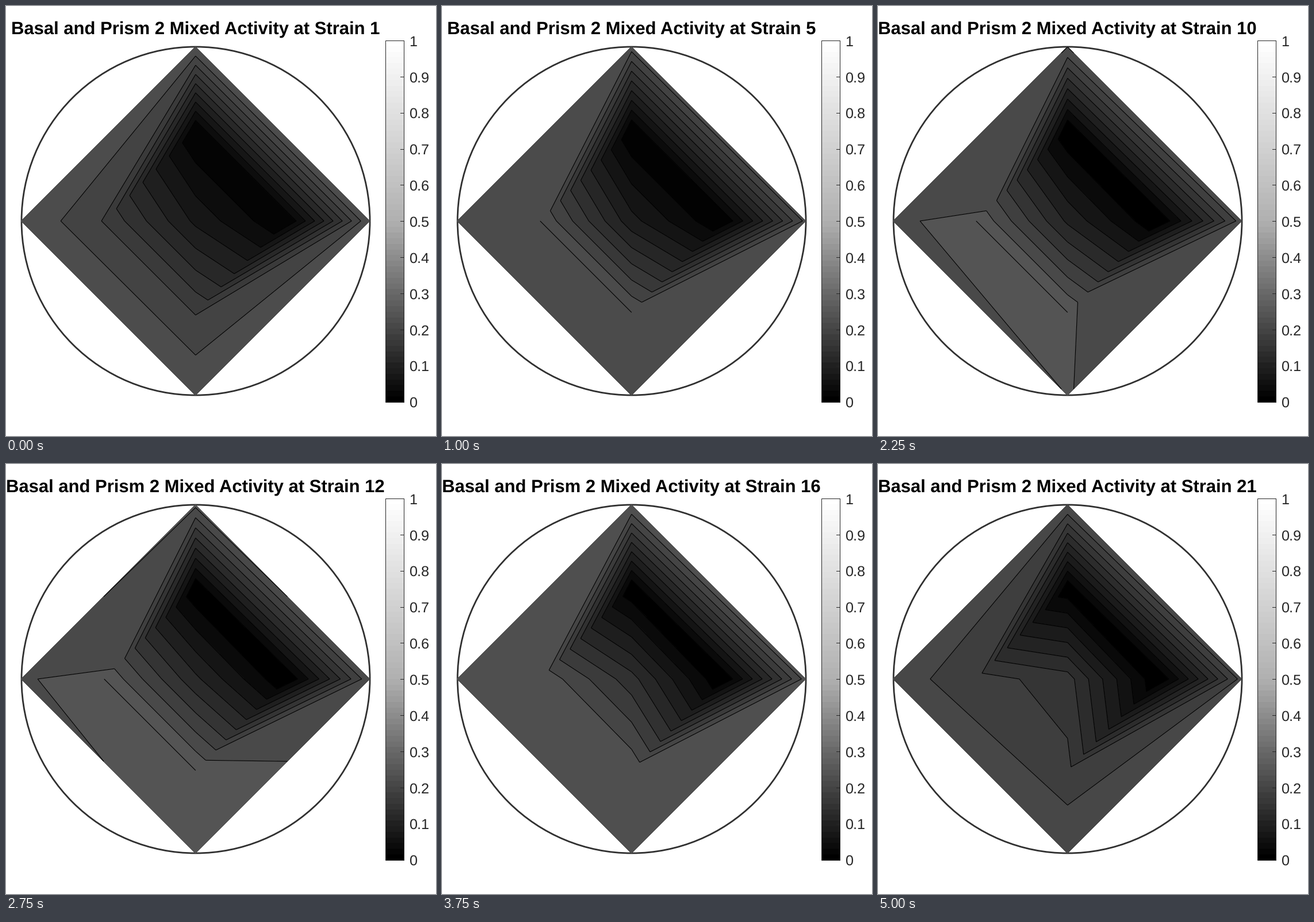
These frames come from a looping animation (748 by 748 pixels, 5250 ms). A matplotlib script:

```python
import numpy as np
import matplotlib.pyplot as plt
from matplotlib.animation import FuncAnimation
from matplotlib.collections import LineCollection, PolyCollection
from matplotlib.patches import Circle, Rectangle

SIZE, DPI = 748, 100
PX = 72 / DPI                       # points per pixel
CX, CY, R_IN, R_OUT = 329.75, 374, 159, 303
LEVELS, STEPS = 8, 21
KNEE = 0.69                         # grey at the middle of the colour map
INK = "#262626"

plt.rcParams["font.family"] = "Liberation Sans"
plt.rcParams["text.hinting"] = "none"

# Mesh nodes: centre, then inner and outer ring as top, right, bottom, left
DIRS = np.array([(0, -1), (1, 0), (0, 1), (-1, 0)])
CENTRE = np.array([(CX, CY)])
NODES = np.vstack([CENTRE, CENTRE + R_IN * DIRS, CENTRE + R_OUT * DIRS])
CELLS = []
for a in range(4):
    b = (a + 1) % 4
    CELLS += [(0, 1 + a, 1 + b), (1 + a, 1 + b, 5 + b, 5 + a)]


def surface(strain):
    """Node heights in contour steps, and the greys of the bands between them."""
    d = strain - 8.5
    rise = 0.0027 * (-d) ** 2.5 if d < 0 else 0.00443 * d ** 1.7
    pole = 0.882 + rise             # outer top and bottom, relative to inner left
    side = pole * (0.937 + 0.06 / (1 + np.exp((strain - 6) / 1.15)))
    peak = max(1, pole)
    unit = (LEVELS + 1) / peak

    middle = 2.76 + 0.1865 * (strain - 1) - 0.64 * np.exp(-((strain - 10.5) / 4.5) ** 2)
    top = 0.017 * max(0, strain - 6)
    bottom = 1 - 0.0035 * max(0, strain - 14)
    z = np.array([middle, top, 0, bottom * unit, unit,
                  pole * unit, side * unit, pole * unit, side * unit])

    highest = (0.268 - 0.0008 * (strain - 11) ** 2) * peak
    dark = 0.016 * max(0, 1 - strain / 8)
    light = 2 * KNEE * highest * LEVELS / (LEVELS + 1)
    return z, np.linspace(dark, light, LEVELS + 1)


def cut(cell, z, level):
    """Parts of a cell at or above the level, and the contour pieces bounding them."""
    n = len(cell)
    up = [z[i] >= level for i in cell]
    if all(up):
        return [NODES[list(cell)]], []

    def cross(i, j):
        p, q = cell[i % n], cell[j % n]
        t = (level - z[p]) / (z[q] - z[p])
        return NODES[p] + t * (NODES[q] - NODES[p])

    polys, lines = [], []
    for i in range(n):
        if up[i] and not up[i - 1]:
            pts, j = [cross(i - 1, i)], i
            while up[j % n]:
                pts.append(NODES[cell[j % n]])
                j += 1
            pts.append(cross(j - 1, j))
            polys.append(np.array(pts))
            lines.append(np.array([pts[0], pts[-1]]))
    return polys, lines


fig = plt.figure(figsize=(SIZE / DPI, SIZE / DPI), dpi=DPI, facecolor="white")
ax = fig.add_axes([0, 0, 1, 1])
ax.axis("off")

# Colour bar
ramp = np.interp(np.linspace(1, 0, 64), [0, 0.5, 1], [0, KNEE, 1])
ax.imshow(ramp[:, None], cmap="gray", vmin=0, vmax=1, aspect="auto",
          interpolation="nearest", extent=(660, 693, 689, 60))
ax.add_patch(Rectangle((660.5, 59.5), 32, 629, fill=False, ec=INK, lw=PX))
for i in range(11):
    y = 688.5 - 62.85 * i
    ax.plot([686.5, 692.5], [y, y], color=INK, lw=PX)
    ax.text(701.5, y + 9.5, f"{i / 10:g}", size=25.2 * PX, color=INK, va="baseline")

ax.set_xlim(0, SIZE)
ax.set_ylim(SIZE, 0)

ax.add_patch(Circle((330, CY), R_OUT, fill=False, ec="#303030", lw=2.8 * PX, zorder=2))
fills = PolyCollection([], linewidths=0, antialiaseds=False, zorder=3)
lines = LineCollection([], colors="black", linewidths=1.1 * PX, zorder=4)
ax.add_collection(fills, autolim=False)
ax.add_collection(lines, autolim=False)
title = ax.text(329.5, 49, "", size=31 * PX, weight="bold", ha="center", va="baseline")


def update(frame):
    strain = frame + 1
    z, greys = surface(strain)
    polys, colours, segs = [NODES[5:]], [str(greys[0])], []
    for level in range(1, LEVELS + 1):
        for cell in CELLS:
            parts, edges = cut(cell, z, level)
            polys += parts
            colours += [str(greys[level])] * len(parts)
            segs += edges
    if 5 <= strain <= 12:           # flat ridge at the maximum
        segs.append(NODES[[4, 3]])
    fills.set_verts(polys)
    fills.set_facecolor(colours)
    lines.set_segments(segs)
    title.set_text(f"Basal and Prism 2 Mixed Activity at Strain {strain}")
    return fills, lines, title


anim = FuncAnimation(fig, update, frames=STEPS, interval=250, repeat=True, repeat_delay=0)
plt.show()
```
